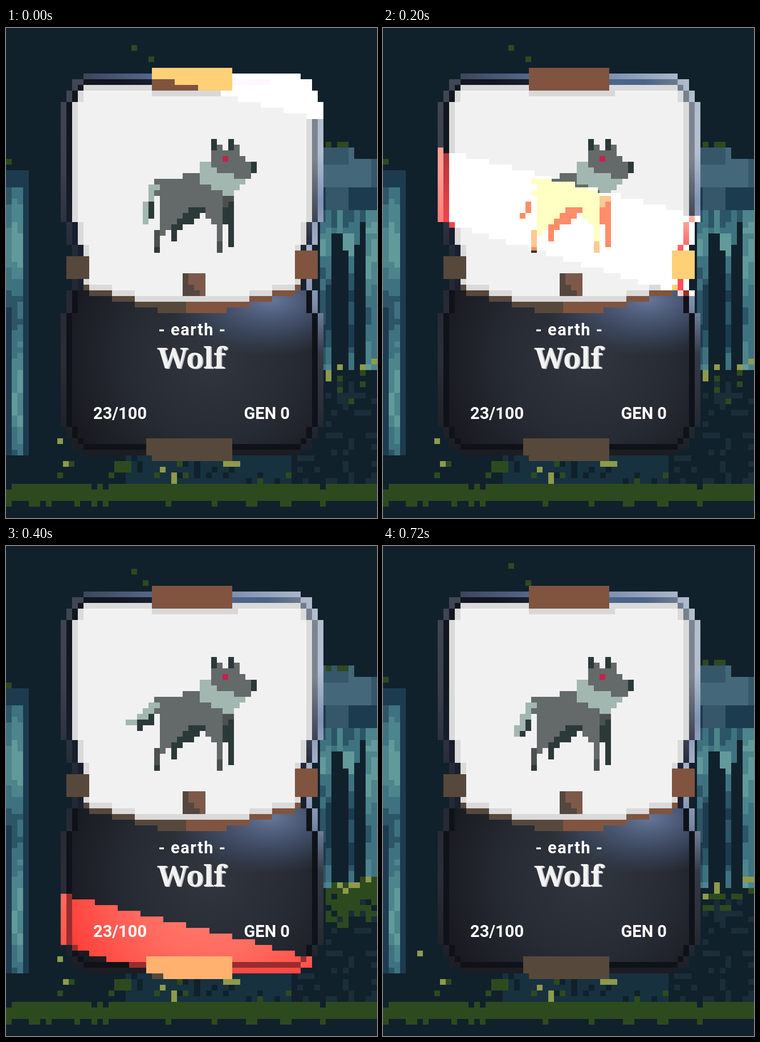
An HTML page with a canvas for the animation above (0.8 s loop, 651x861 px).

```html
<!DOCTYPE html>
<html lang="en">
<head>
<meta charset="utf-8">
<title>Wolf card</title>
<style>
html, body { margin: 0; width: 100%; height: 100%; overflow: hidden; background: #10212c; }
canvas { display: block; }
</style>
</head>
<body>
<canvas width="651" height="861"></canvas>
<script>
const ctx = document.querySelector('canvas').getContext('2d');
const CELL = 10.015, CARD_X = 9.6, CARD_W = 46, TOP = 8, BOTTOM = 74, WAIST = 41.5;
const WOLF_X = -.05, WOLF_Y = .47;
const NIGHT = '#10212c', GREEN = '#2d4a1f', LIME = '#8e9a4b';
const MIST = ['#1c3b4f', '#2c5566', '#3f7280', '#4d858c', '#629a9b'];
const BROWN = '#80543f', DARK_BROWN = '#57483c';
const GREY = '#646a69', MID = '#4c514f', DARK = '#2c3939', FUR = '#a2b7b0';

const snap = v => Math.round(v * CELL);
const clamp = (v, lo, hi) => Math.max(lo, Math.min(hi, v));
const noise = (x, y) => {
  const v = Math.sin(x * 127.1 + y * 311.7) * 43758.5;
  return v - Math.floor(v);
};
function addCell(path, x, y, w, h) {
  path.rect(snap(x), snap(y), snap(x + w) - snap(x), snap(y + h) - snap(y));
}
function fill(path, style) {
  ctx.fillStyle = style;
  ctx.fill(path);
}
function block(color, x, y, w = 1, h = 1) {
  const path = new Path2D();
  addCell(path, x, y, w, h);
  fill(path, color);
}
const cardBlock = (color, x, ...rest) => block(color, x + CARD_X, ...rest);

function stops(g, colors) {
  colors.forEach((c, i) => g.addColorStop(i / (colors.length - 1), c));
  return g;
}
const linear = (x0, y0, x1, y1, ...colors) => stops(ctx.createLinearGradient(x0, y0, x1, y1), colors);
const radial = (x, y, r, ...colors) => stops(ctx.createRadialGradient(x, y, 0, x, y, r), colors);

// Side inset of a card row; each level shrinks the outline by one cell.
function inset(y, level = 0) {
  if (y < TOP || y > BOTTOM) return CARD_W / 2;
  if (level) return Math.max(inset(y, level - 1) + 1, inset(y - 1, level - 1), inset(y + 1, level - 1));
  const corner = Math.round(4.1 * .605 ** Math.min(y - TOP, BOTTOM - y));
  const gap = Math.abs(y - WAIST);
  return Math.max(corner, gap < 4 ? 2 : gap < 8 ? 1 : 0);
}
function outline(level, from = TOP, to = BOTTOM + 1) {
  const path = new Path2D();
  for (let y = from; y < to; y++) {
    const side = inset(y, level);
    if (side < CARD_W / 2) addCell(path, CARD_X + side, y, CARD_W - 2 * side, 1);
  }
  return path;
}
const edge = outline(0), lowerFill = outline(2, 46);
const fittings = [
  [BROWN, 16, 7, 14, 4], [BROWN, 41, 39, 4, 5], [DARK_BROWN, 1, 40, 4, 4],
  [DARK_BROWN, 15, 72, 15, 3], [DARK_BROWN, 16, 75, 14, 1]
];
const whole = new Path2D(edge);
for (const [, x, ...rest] of fittings) addCell(whole, x + CARD_X, ...rest);

// Misty light falls in soft bands between the trees.
function mist(x, y, shade) {
  const band = 2 + 2 * Math.cos((y - 38) * Math.PI / 13);
  const patch = 2 * noise(x, Math.floor(y / 4)) - 1;
  block(MIST[clamp(Math.round(band * .7 + 1 + patch - shade), 0, 4)], x, y);
}
function forest(pose) {
  const windy = pose === 1;
  ctx.fillStyle = NIGHT;
  ctx.fillRect(0, 0, 651, 861);
  for (let x = 0; x < 4; x++)
    for (let y = 25; y < 75; y++)
      mist(x, y, x === 3 || x === 0 && y > 48 || y < 28 ? 4 : 0);
  for (let x = 55; x < 65; x++) {
    const trunk = [57, 58, 59, 61, 62].includes(x);
    const crown = x < 61 ? 21 : 23;
    for (let y = crown; y < 60; y++)
      if (trunk && y > 32 + 8 * noise(x, 1)) block(NIGHT, x, y);
      else if (y < 32) block(['#1c3b4f', '#36566a', '#44687a'][Math.floor(2.9 * noise(x >> 2, y >> 2))], x, y);
      else mist(x, y, x < 63 ? 1 : 0);
  }
  // ground and specks
  for (let x = 0; x < 65; x++) {
    for (let y = 62; y < 80; y++) {
      const n = noise(x, y);
      if (x > 55 || x > 50 && y > 74) block(n < .22 ? '#1a2d39' : NIGHT, x, y);
      else if (y > 74) block(n < .05 ? GREEN : n < .07 ? LIME : n > .2 && x > 20 && x < 50 ? '#17313f' : NIGHT, x, y);
    }
    block(GREEN, x, 80 + (noise(x, 2) < .06), 1, 3);
    if (noise(x, 3) < .3) block(GREEN, x, 83);
  }
  block(GREEN, 19, 76, 3, 2);
  block(LIME, 38, 76, 3);
  // bush and leaves stirred by the wind
  for (let x = 56; x < 65; x++) {
    const top = 58 + Math.round((64 - x) / 5);
    for (let d = 0; d < 8; d++) {
      const n = noise(x + pose * 9, d);
      const density = windy ? 1.1 - d * .12 : .4 - d * .06;
      if (n < (d < 2 ? .5 - d * .2 : 0)) block(LIME, x, top + d);
      else if (n < density) block(GREEN, x, top + d);
    }
    if (x < 62 && noise(x, 5) < .5) block(GREEN, x, windy ? 21 : 20);
  }
  block(GREEN, 22, windy ? 4 : 3);
  block(GREEN, windy ? 24 : 25, pose ? 6 : 5);
  block(GREEN, 0, windy ? 24 : 23);
  block(LIME, pose === 2 ? 6 : 9, pose === 2 ? 71 : 72);
}

function card() {
  fill(edge, linear(0, 80, 0, 750, '#414756', '#3b404d', '#232734', '#2b2e36', '#1b1d23'));
  ctx.save();
  ctx.clip(edge);
  ctx.fillStyle = linear(136, 0, 557, 0, '#3c465c', '#5a6c90', '#8596b3', '#b8c3d2');
  ctx.fillRect(136, 80, 421, 50);
  ctx.fillStyle = linear(0, 130, 0, 750, '#b2bdcd', '#b4c0d2', '#7f92b6', '#a9b5cb', '#7d8cab', '#343a46', '#2b2f38', '#1c1f25');
  ctx.fillRect(517, 130, 40, 621);
  ctx.restore();
  const upperLine = outline(1, TOP, 46);
  fill(upperLine, linear(106, 0, 547, 0, '#12161f', '#11151f', '#1a2333', '#4d658d', '#4a6388', '#80868f'));
  fill(upperLine, linear(0, 230, 0, 400, '#1a203000', '#1a2030'));
  fill(outline(1, 46), '#0f1218');
  fill(lowerFill, radial(360, 580, 290, '#31363f', '#272b33', '#15171c'));
  ctx.save();
  ctx.clip(lowerFill);
  ctx.translate(465, 478);
  ctx.scale(1.85, 1);
  ctx.fillStyle = radial(0, 0, 98, '#66779a', '#53658a90', '#455a8000');
  ctx.fillRect(-100, -100, 200, 200);
  ctx.restore();
  fill(outline(2, TOP, 45), '#dadada');
  fill(outline(3, TOP, 45), '#f1f1f1');
  cardBlock('#d8d8d8', 16, 11, 15);
  // sagging divider below the picture
  for (let x = 4; x < 42; x++) {
    const row = Math.min(49, Math.round(50 - Math.abs(x - 22.5) / 4)), start = Math.min(row, 48);
    if (row > 45) cardBlock('#dadada', x, 45, 1, start - 45);
    if (row > 46) cardBlock('#f1f1f1', x, 45, 1, start - 46);
    cardBlock(x < 22 ? DARK_BROWN : BROWN, x, start, 1, row + 1 - start);
  }
  for (const [color, ...box] of fittings) cardBlock(color, ...box);
  for (let i = 0; i < 4; i++) {
    const dark = Math.max(1, i);
    block('#7d594a', 31 + WOLF_X, 43 + i, 4);
    block('#55473f', 31 + WOLF_X, 43 + i, dark);
  }
}

// Fills every cell whose centre lies inside the outline.
function shape(color, outlinePath) {
  const path = new Path2D(outlinePath);
  for (let y = 18; y < 40; y++)
    for (let x = 20; x < 45; x++)
      if (ctx.isPointInPath(path, x + .5, y + .5)) block(color, x + WOLF_X, y + WOLF_Y);
}
// The tail is a curve whose tip rises with lift.
function tail(lift) {
  const tipX = 24.5 - 3 * lift ** 1.5, tipY = 33.5 - 3 * lift ** 2;
  const stroke = (color, from, to, dx, dy) => {
    for (let p = from; p <= to; p += .05) {
      const q = 1 - p;
      const x = q * q * 26.3 + 2 * p * q * 24.7 + p * p * tipX;
      const y = q * q * 27 + 2 * p * q * 29.5 + p * p * tipY;
      block(color, Math.floor(x + dx) + WOLF_X, Math.floor(y + dy) + WOLF_Y);
    }
  };
  stroke(DARK, .4, .85, .7, 1);
  stroke(FUR, 0, 1, 0, 0);
}
function wolf(lift) {
  shape(DARK, 'M35 31H33L29 34V37H30V35.4L35 32Z');
  shape(GREY, 'M26 26H31V25H35L39 28V33H38V39H37V34L35 32V31H33L28 35V36H27V29H26Z');
  shape(MID, 'M26 35H27V38H26ZM37 37H38V39H37ZM38 28H40V31H38Z');
  shape(DARK, 'M38 32L40 30V38H39V34H38ZM26 38H27V39H26Z');
  shape(FUR, 'M34 23H36L38 25H40V26H42L40 29H39L34 26.4Z');
  shape(GREY, 'M36 21H37V20H38V21H40V20H41V22H42V23H44V25H43V26H40V25H37V24H36Z');
  shape(DARK, 'M36 19H37V21H36ZM39 19H40V21H39ZM43 23H44V25H43Z');
  shape('#c2234f', 'M38 22H39V23H38Z');
  tail(lift);
}

function label(text, x, y, font, color, align = 'center', spacing = '0px') {
  ctx.font = font;
  ctx.fillStyle = color;
  ctx.textAlign = align;
  ctx.letterSpacing = spacing;
  ctx.fillText(text, x, y);
}
function labels() {
  const small = 'bold 29px Roboto, sans-serif', big = '900 50px "Noto Serif", serif';
  label('- earth -', 327, 540, small, '#fff', 'center', '1.5px');
  label('Wolf', 327, 599, big, '#bfc1c4');
  label('Wolf', 325, 598, big, '#f2f2f2');
  label('23/100', 153, 687, small, '#fff', 'left');
  label('GEN 0', 498, 687, small, '#fff', 'right');
}

// Each pose of the gleam: lower border at mid card, its slope, thickness.
const gleams = [[103, .26, 140], [188, .3, 120], [408, .305, 136], [724, .375, 120], [770, .3, 101]];
function gleam([low, slope, thick]) {
  ctx.save();
  ctx.clip(whole);
  ctx.globalCompositeOperation = 'color-dodge';
  for (let i = 0; i < CARD_W; i++) {
    const dx = (CARD_X + i + .5) * CELL - 326;
    const bottom = Math.round((low + slope * dx) / CELL);
    const top = Math.round((low - thick + (slope - .045) * dx) / CELL);
    cardBlock('#e69876', i, top, 1, bottom - top);
  }
  ctx.restore();
}

let shown = -1;
function draw() {
  const step = Math.min(6, Math.floor(performance.now() % 800 / 100));
  if (step !== shown) {
    shown = step;
    forest(Math.floor(step / 3));
    card();
    wolf(step < 6 ? Math.floor(step / 2) / 2 : .5);
    if (gleams[step]) gleam(gleams[step]);
    labels();
  }
  requestAnimationFrame(draw);
}
draw();
</script>
</body>
</html>
```
